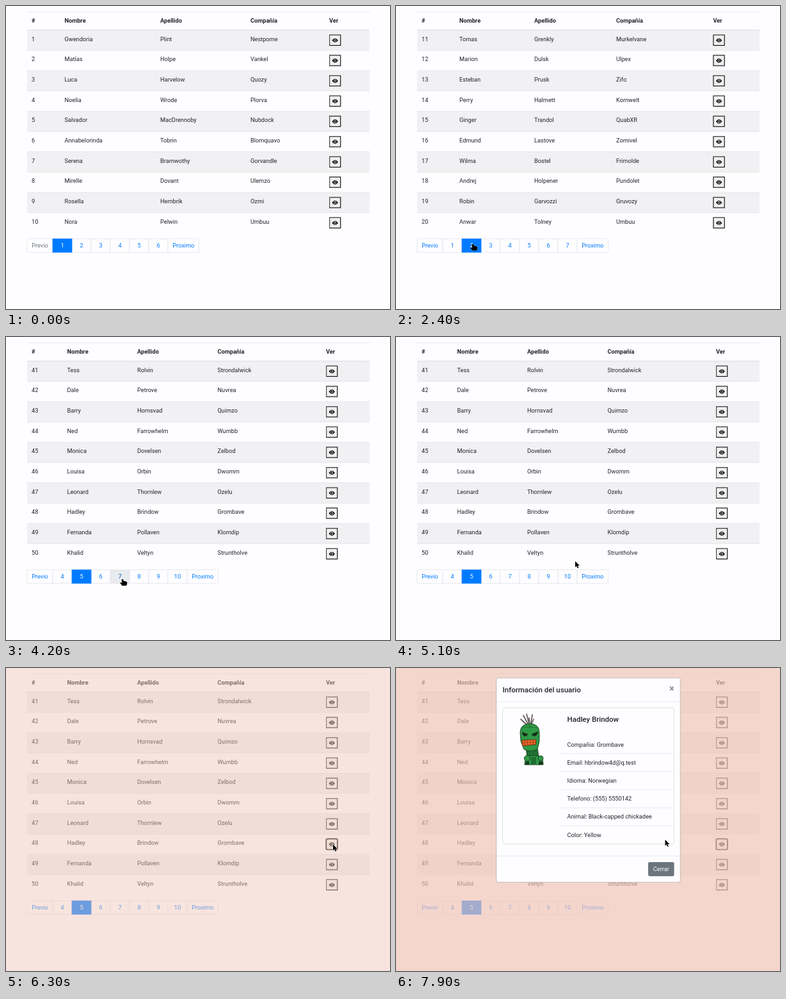
Animation of 600x473 px, one loop 8000 ms. Source, as an HTML page:

```html
<!DOCTYPE html>
<html lang="es">
<head>
<meta charset="utf-8">
<title>Tabla de usuarios</title>
<style>
  html, body { margin: 0; width: 100%; height: 100%; overflow: hidden; background: #fefdff; }
  svg { display: block; width: 600px; height: 473px; font: 9.21px Roboto, sans-serif; }
  text { white-space: pre; }
</style>
</head>
<body>
<svg id="stage" viewBox="0 0 600 473"></svg>
<script>
const LOOP = 8000, STEP = 100;
const ROW = 31.67, TOP = 37.6, BAR = 363;
const INK = '#212529', BLUE = '#007bff', LINE = '#dee2e6', PAPER = '#fefdff';

const rows = text => text.split('|').map(row => row.split(' '));

const pages = {
  1: { cols: [91.5, 241, 382, 505], links: [1, 2, 3, 4, 5, 6], data: rows(
    'Gwendoria Plint Nestpome|Matías Holpe Vankel|Luca Harvelow Quozy|Noelia Wrode Plorva|' +
    'Salvador MacDrennoby Nubdock|Annabelorinda Tobrin Blomquavo|Serena Bramwothy Gorvandle|' +
    'Mirelle Dovant Ulemzo|Rosella Hembrik Ozmi|Nora Pelwin Umbuu') },
  2: { cols: [99, 216, 344, 495.5], links: [1, 2, 3, 4, 5, 6, 7], data: rows(
    'Tomas Grenkly Murkelvane|Marion Dulsk Ulpex|Esteban Prusk Zifo|Perry Halmett Kornwelt|' +
    'Ginger Trandol QuabXR|Edmund Lastove Zomivel|Wilma Bostel Frimolde|' +
    'Andrej Holpener Pundolet|Robin Garvozzi Gruvozy|Anwar Tolney Umbuu') },
  3: { cols: [97, 211, 338, 497.5], links: [2, 3, 4, 5, 6, 7, 8], data: rows(
    'Irene Vostley Drelmopa|Felix Trummond Zorvik|Paloma Hesk Quandle|Oscar Brimlow Wulfeno|' +
    'Lidia Corvash Plemtix|Hugo Danforle Ombriva|Valeria Nupp Skelbo|' +
    'Simon Orwick Trundova|Celia Mortave Velquo|Bruno Haskelp Jombrax') },
  5: { cols: [95.5, 205, 330.5, 500], links: [4, 5, 6, 7, 8, 9, 10], data: rows(
    'Tess Rolvin Strondalwick|Dale Petrove Nuvrea|Barry Hornsvad Quimzo|Ned Farrowhelm Wumbb|' +
    'Monica Dovelsen Zelbod|Louisa Orbin Dwomm|Leonard Thornlew Ozelu|' +
    'Hadley Brindow Grombave|Fernanda Pollaven Klomdip|Khalid Veltyn Struntholve') },
};

// Start time of each page and of the click that leads to it
const pageStarts = [[0, 1], [2200, 2], [3500, 3], [4000, 5]];
const clicks = [2100, 3400, 3900];
const EYE_CLICK = 6100, CHOSEN = 7;

// Pointer tip: time, x, y
const trail = [
  [100, 88, 371], [300, 250, 305], [600, 531, 154], [800, 520, 250], [900, 516, 305],
  [1000, 470, 330], [1300, 76, 372], [1600, 122, 370.5], [1800, 120, 371.5], [2400, 120, 371.5],
  [2900, 149.5, 371], [3500, 149.5, 371], [3800, 178, 374], [4000, 178, 374], [4200, 182, 378],
  [4500, 180, 405], [4700, 128, 376], [4800, 122, 374], [5100, 280, 350], [5400, 496, 263],
  [5600, 507, 270], [5700, 511, 275.5], [6700, 511, 275.5], [6900, 478, 262],
  [7400, 430, 240], [7800, 418.5, 254], [7900, 420.5, 268],
];

const clamp = v => Math.max(0, Math.min(1, v));
const easeOut = p => 1 - (1 - p) ** 2.4;

const rect = (x, y, w, h, fill, extra = '') =>
  `<rect x="${x}" y="${y}" width="${w}" height="${h}" fill="${fill}" ${extra}/>`;
const label = (x, y, str, extra = '') => `<text x="${x}" y="${y}" fill="${INK}" ${extra}>${str}</text>`;
const path = (d, fill, extra = '') => `<path d="${d}" fill="${fill}" ${extra}/>`;
const rule = (x1, x2, y, w = .7) => rect(x1, y - w / 2, x2 - x1, w, LINE);

function pointerAt(t) {
  if (t < trail[0][0]) return null;
  const next = trail.findIndex(p => p[0] > t);
  if (next < 0) return trail[trail.length - 1].slice(1);
  const [t0, x0, y0] = trail[next - 1], [t1, x1, y1] = trail[next];
  const p = (t - t0) / (t1 - t0);
  return [x0 + (x1 - x0) * p, y0 + (y1 - y0) * p];
}

function eyeButton(x, y, focused) {
  const frame = focused
    ? rect(x + .3, y + .2, 17.6, 16.8, '#efefef', 'rx="2" stroke="#101010" stroke-width="1.7"')
    : rect(x, y, 18.3, 17.3, '#111') +
      path(`M${x} ${y + 17.3}V${y}H${x + 18.3}l-1.2 1.2H${x + 1.2}V${y + 16.1}z`, '#4c4c4c') +
      rect(x + 1.15, y + 1.15, 16, 15, '#efefef');
  return frame + `<g transform="translate(${x + 9.15} ${y + 8.8})">` +
    path('M-4.7 0Q0-6.4 4.7 0Q0 6.4-4.7 0z', '#000') +
    '<circle r="2.1" fill="#efefef"/><circle r="1.25"/></g>';
}

function table(number, focused) {
  const { cols, data } = pages[number];
  const bold = 'font-weight="700"';
  let out = rule(33, 568, 9) + label(40, 25.9, '#', bold);
  ['Nombre', 'Apellido', 'Compañía', 'Ver'].forEach((h, i) => out += label(cols[i], 25.9, h, bold));
  data.forEach((cells, i) => {
    const y = TOP + i * ROW;
    if (i % 2 === 0) out += rect(33, y, 535, ROW, '#f1f0f2');
    out += rule(33, 568, y, i ? .7 : 1.2);
    out += label(40, y + 17, (number - 1) * 10 + i + 1);
    cells.forEach((cell, c) => out += label(cols[c], y + 17, cell));
    out += eyeButton(cols[3], y + 7.2, focused && i === CHOSEN);
  });
  return out;
}

function pager(number, pointer, clicking) {
  const { links } = pages[number];
  const end = 73 + links.length * 30;
  const items = [['Previo', 33, 40], ...links.map((n, i) => [n, 73 + i * 30, 30]), ['Proximo', end, 48.5]];
  let out = '', top = '';
  for (const [name, x, w] of items) {
    const active = name === number, disabled = name === 'Previo' && number === 1;
    const over = pointer && !active && !disabled && pointer[0] >= x && pointer[0] < x + w &&
      pointer[1] >= BAR && pointer[1] < BAR + 22;
    const fill = active ? BLUE : over ? '#e9ecef' : PAPER;
    const color = active ? '#fff' : disabled ? '#6c757d' : over ? '#0056b3' : BLUE;
    const rounded = typeof name === 'string' ? 'rx="2"' : '';
    const item = rect(x, BAR + .3, w, 21.4, fill,
      `stroke="${active ? BLUE : LINE}" stroke-width=".7" ${rounded}`) +
      `<text x="${x + w / 2}" y="377.2" fill="${color}" text-anchor="middle">${name}</text>`;
    // The active link and the focus ring lie above their neighbours
    if (active) top += item; else out += item;
    if (over && clicking)
      top += rect(x - .8, BAR - .6, w + 1.8, 23.2, 'none', 'rx="1" stroke="#007bff" stroke-opacity=".3" stroke-width="2"');
  }
  return out + top;
}

function robot() {
  const line = 'stroke="#173a1c" stroke-width=".9" stroke-linejoin="round"';
  const green = '#2f9a45', dark = '#1f6f33';
  let out = path('M207 91L195 80M208 91L199 74M209 91L204 72M209 91L208 78M210 91L213 73M210 91L215 80',
    'none', 'stroke="#6d6360" stroke-width="1.8" stroke-linecap="round"');
  out += path('M203 126h18l2 12h-18z', dark, line);
  out += path('M201 151q0-13 9-14h12q8 1 8 14z', green, line);
  out += '<circle cx="205" cy="141" r="4.6" fill="#2f9a45" stroke="#173a1c" stroke-width=".9"/>' +
    '<circle cx="226" cy="141" r="4" fill="#2f9a45" stroke="#173a1c" stroke-width=".9"/>';
  out += path('M211 139h8v12h-8z', dark) + path('M202 151l1-5h5v5zM223 151v-5h6l1 5z', '#173a1c');
  out += path('M194 100q1-13 15-13q14 0 15 13v14l-3 13q-11 5-21 0l-5-13z', green, line);
  out += path('M195 94q13-4 28 0M209 88v6', 'none', 'stroke="#1f6f33" stroke-width=".9"');
  out += path('M197 100l9 3q-1 4-5 3.5q-4-1-4-6.5zM222 99l-10 4q1 4 5 3.5q4-1 5-7.5z', '#182c1b');
  out += path('M196.500 113l22-1.500v8l-21 2z', '#f0682a', 'stroke="#5a2412" stroke-width=".8"');
  out += path('M201 113v8M205.500 113v8M210 112v8M214.500 112v8M197 117l21-1.500', 'none', 'stroke="#7d2f14" stroke-width=".6"');
  return out;
}

function dialog() {
  const [first, last, company] = pages[5].data[CHOSEN];
  const facts = [`Compañia: ${company}`, 'Email: hbrindow4d@q.test', 'Idioma: Norwegian',
    'Telefono: (555) 5550142', 'Animal: Black-capped chickadee', 'Color: Yellow'];
  const title = 'font-size="11.5" font-weight="500"';
  let out = rect(156.8, 15.6, 287.4, 318.8, PAPER, 'rx="2.6" stroke="#000" stroke-opacity=".25" stroke-width=".8"');
  out += label(166.5, 37.9, 'Información del usuario', title);
  out += label(431, 36.6, '×', 'font-size="13.8" font-weight="700" text-anchor="middle" opacity=".55"');
  out += rule(157, 444, 52.8) + rule(157, 444, 293.3);
  out += rect(166.6, 62.2, 267.8, 212.6, 'none', 'rx="2.3" stroke="#dcdbdd" stroke-width=".8"');
  out += robot() + label(267.5, 84.3, `${first} ${last}`, title);
  facts.forEach((fact, i) => {
    const y = 122.6 + i * 28.2;
    out += label(267.5, y, fact);
    if (i < 5) out += rule(256.5, 434.4, y + 11);
  });
  out += rect(394, 303, 40.6, 21.9, '#6c757d', 'rx="2.3"');
  return out + '<text x="414.3" y="317.3" fill="#fff" text-anchor="middle">Cerrar</text>';
}

function cursor([x, y], hand) {
  const shape = hand
    ? 'M-1.4 .6Q0-.8 1.2 .6L1.8 3Q3.2 2.4 4 3.5Q5.400 2.900 5.900 4.100Q7.200 3.800 7.300 5.100L7 8.200L6 10.200H-.4L-3.600 6.400Q-3.700 4.900 -1.900 5.200L-.8 5.800z'
    : 'M0 0V9.6L2.2 7.6L3.7 11L5.4 10.2L3.9 7H7z';
  return `<g transform="translate(${x} ${y})">` +
    path(shape, '#000', `stroke="#fff" stroke-width="${hand ? .5 : 1}" stroke-linejoin="round" paint-order="stroke"`) + '</g>';
}

function scene(t) {
  const number = pageStarts.filter(p => p[0] <= t).pop()[1];
  const pointer = pointerAt(t);
  const veil = clamp((t - 6200) / 150);
  const shown = clamp((t - 6300) / 150), slide = easeOut(clamp((t - 6300) / 300));
  let out = rect(0, 0, 600, 473, PAPER) + table(number, t >= EYE_CLICK);
  out += pager(number, t < EYE_CLICK ? pointer : null, clicks.includes(t));
  if (veil) out += rect(0, 0, 600, 473, '#f0c5b6', `opacity="${veil * .68}"`);
  if (shown) out += `<g opacity="${shown}" transform="translate(0 ${-29 * (1 - slide)})">${dialog()}</g>`;
  if (pointer) {
    const [x, y] = pointer;
    const barEnd = 121.5 + pages[number].links.length * 30;
    out += cursor(pointer, y >= BAR && y < BAR + 22 && x > 33 && x < barEnd);
  }
  return out;
}

const stage = document.getElementById('stage');
const start = performance.now();
let shownTick = -1;

function tick() {
  const t = Math.floor((performance.now() - start) % LOOP / STEP) * STEP;
  if (t !== shownTick) {
    stage.innerHTML = scene(t);
    shownTick = t;
  }
  requestAnimationFrame(tick);
}
tick();
</script>
</body>
</html>
```
